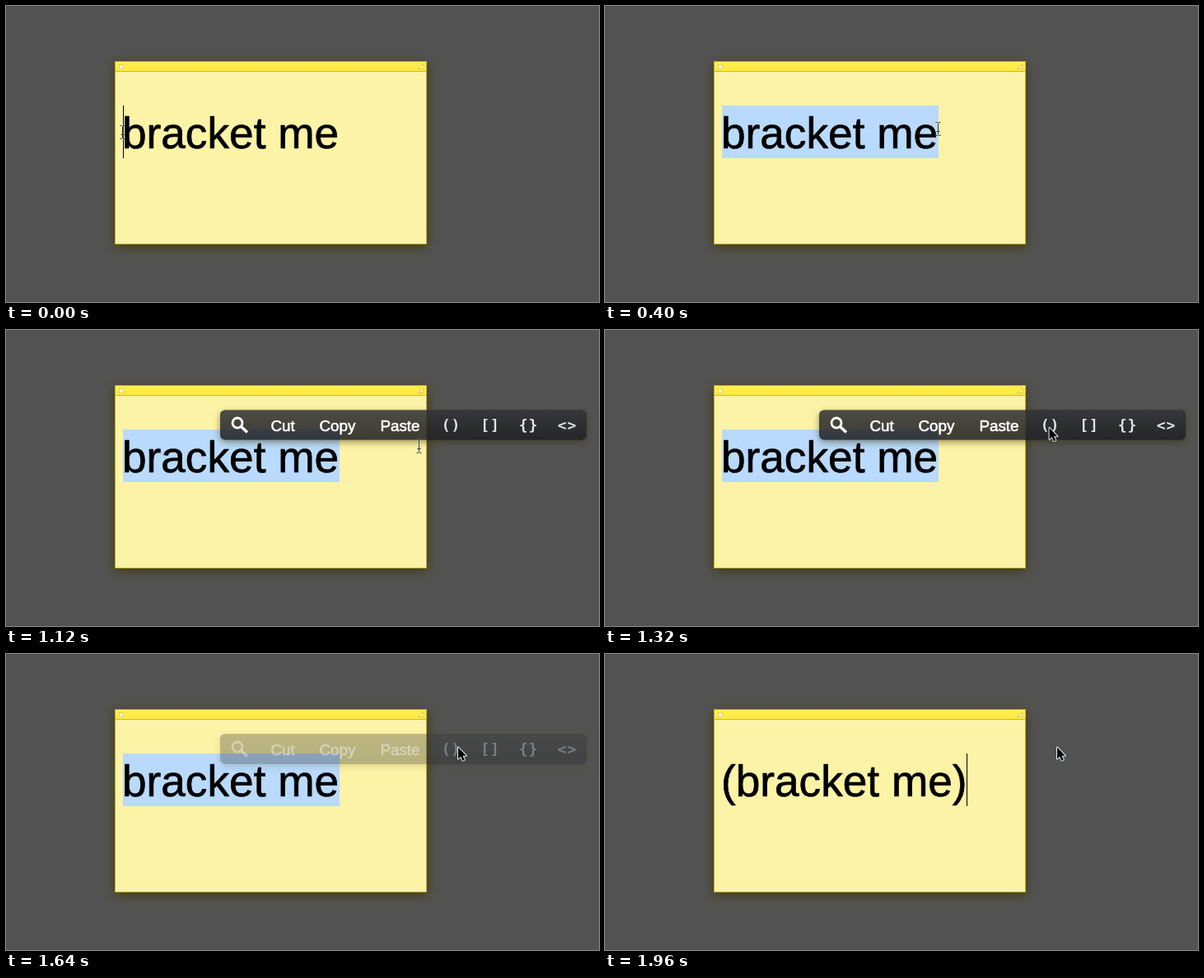
An HTML page with a canvas for the animation above (3460 ms loop, 720x360 px).

```html
<!DOCTYPE html>
<html lang="en">
<head>
<meta charset="utf-8">
<title>Bracket a selection</title>
<style>
html, body { margin: 0; width: 100%; height: 100%; overflow: hidden; background: #525252; }
canvas { display: block; }
</style>
</head>
<body>
<canvas width="720" height="360"></canvas>
<script>
const ctx = document.querySelector("canvas").getContext("2d");
const LOOP = 3460, STEP = 40, LAST_CHANGE = 1960;
const NOTE_FONT = '53.2px "Liberation Sans", Arial, sans-serif';
const MENU_FONT = '18.8px "Liberation Sans", Arial, sans-serif';
const CODE_FONT = 'bold 18px "DejaVu Sans Mono", monospace';
const TEXT = "bracket me", TEXT_X = 142, BASELINE = 173.4;

const clamp01 = v => Math.max(0, Math.min(1, v));
const progress = (t, from, to) => clamp01((t - from) / (to - from));
const smooth = p => p * p * (3 - 2 * p);
const mix = (a, b, p) => a + (b - a) * p;

function rect(x, y, w, h, color) {
  ctx.fillStyle = color;
  ctx.fillRect(x, y, w, h);
}

// a thin outline gives the text its slightly heavier strokes
function label(text, x, y, font, color, outline = 0) {
  ctx.font = font;
  ctx.fillStyle = ctx.strokeStyle = color;
  ctx.fillText(text, x, y);
  if (!outline) return;
  ctx.lineWidth = outline;
  ctx.lineJoin = "round";
  ctx.strokeText(text, x, y);
}

function shadow(color, blur, y) {
  ctx.shadowColor = color;
  ctx.shadowBlur = blur;
  ctx.shadowOffsetY = y;
}

function gradient(y1, y2, top, bottom) {
  const g = ctx.createLinearGradient(0, y1, 0, y2);
  g.addColorStop(0, top);
  g.addColorStop(1, bottom);
  return g;
}

function drawNote() {
  ctx.save();
  shadow("rgba(60,53,0,.8)", 13, 3);
  rect(132, 67, 379, 223, "#c4ab22");
  ctx.restore();
  rect(133, 68, 377, 11, gradient(68, 79, "#ffef55", "#ffea3c"));
  rect(133, 79, 377, 1, "#cdb72c");
  rect(133, 80, 377, 209, "#fdf3a7");
  rect(137, 71, 6, 6, "#e2cf55");
  rect(138, 72, 4, 4, "#fffbd8");
  ctx.beginPath();
  ctx.moveTo(500.5, 76.5);
  ctx.lineTo(507, 70.5);
  ctx.lineTo(507, 76.5);
  ctx.closePath();
  ctx.fillStyle = "#fff7b0";
  ctx.fill();
  ctx.strokeStyle = "#d9c44a";
  ctx.lineWidth = 1;
  ctx.stroke();
}

// x of the boundary between characters that lies nearest to the pointer
function selectionEnd(pointerX) {
  ctx.font = NOTE_FONT;
  let best = TEXT_X;
  for (let i = 1; i <= TEXT.length; i++) {
    const x = TEXT_X + ctx.measureText(TEXT.slice(0, i)).width;
    if (Math.abs(x - pointerX) < Math.abs(best - pointerX)) best = x;
  }
  return Math.round(best);
}

function drawText(t, pointerX) {
  const bracketed = t >= 1800;
  const end = bracketed ? 439 : selectionEnd(pointerX);
  if (bracketed || end === TEXT_X) rect(end, 121, 1, 64, "#000");
  else rect(TEXT_X, 121, end - TEXT_X, 64, "#b9dafd");
  label(bracketed ? `(${TEXT})` : TEXT, TEXT_X - 1, BASELINE, NOTE_FONT, "#000", .7);
}

function drawMenu(opacity) {
  const panel = new Path2D();
  panel.roundRect(260, 97.5, 445, 36, 6);
  const outside = new Path2D("M0 0H720V360H0Z");
  outside.addPath(panel);

  ctx.save();
  ctx.globalAlpha = opacity;
  ctx.save();
  ctx.clip(outside, "evenodd");
  shadow("rgba(50,44,0,.5)", 9, 3);
  ctx.fillStyle = "#000";
  ctx.fill(panel);
  ctx.restore();
  ctx.fillStyle = gradient(97, 133, "rgba(50,51,54,.87)", "rgba(31,32,35,.87)");
  ctx.fill(panel);

  ctx.strokeStyle = "#fff";
  ctx.lineWidth = 2.8;
  ctx.beginPath();
  ctx.arc(281, 113, 6, 0, 2 * Math.PI);
  ctx.stroke();
  ctx.lineWidth = 3.4;
  ctx.beginPath();
  ctx.moveTo(286, 118);
  ctx.lineTo(293, 124.5);
  ctx.stroke();

  for (const [text, x] of [["Cut", 321.5], ["Copy", 380.5], ["Paste", 454.5]])
    label(text, x, 123, MENU_FONT, "#fff", .6);
  ctx.textAlign = "center";
  ctx.letterSpacing = "0.8px";
  for (const [text, x] of [["()", 540.5], ["[]", 588], ["{}", 634.5], ["<>", 681.5]])
    label(text, x, 121.5, CODE_FONT, "#dce5e9");
  ctx.restore();
}

function drawBeam(x, y) {
  ctx.save();
  ctx.translate(Math.round(x) + .5, Math.round(y) + .5);
  const path = new Path2D("M-3-8h2l1 1 1-1h2M0-7V7M-3 8h2l1-1 1 1h2M-2 3h4");
  ctx.lineWidth = 2;
  ctx.strokeStyle = "rgba(255,255,255,.35)";
  ctx.stroke(path);
  ctx.lineWidth = 1;
  ctx.strokeStyle = "#333";
  ctx.stroke(path);
  ctx.restore();
}

function drawArrow(x, y) {
  ctx.save();
  ctx.translate(x, y);
  const path = new Path2D("M0 0V14L3.2 11.2 5.4 16.2 7.8 15.2 5.6 10.2H9.8Z");
  ctx.lineJoin = "round";
  ctx.lineWidth = 2;
  ctx.strokeStyle = "#e8edf2";
  ctx.stroke(path);
  ctx.fillStyle = "#050505";
  ctx.fill(path);
  ctx.restore();
}

function pointerAt(t) {
  if (t < 640) {
    const p = smooth(progress(t, 0, 390));
    return [mix(141, 404, p), mix(153, 149, p)];
  }
  if (t < 1120) {
    const p = progress(t, 640, 1120) ** 1.5;
    return [mix(404, 501, p), mix(149, 141, p)];
  }
  const p = 1 - (1 - progress(t, 1120, 1480)) ** 2;
  return [mix(501, 549, p), mix(141, 113.5, p)];
}

function draw(t) {
  const [x, y] = pointerAt(t);
  // the whole text stays selected once the drag has ended
  const dragX = Math.min(x, 405);
  rect(0, 0, 720, 360, "#525252");
  drawNote();
  drawText(t, dragX);
  if (t >= 600 && t < 1750) drawMenu(1 - smooth(progress(t, 1480, 1750)));
  if (y < 133) drawArrow(x, y);
  else drawBeam(x, y);
}

const start = performance.now();
function tick() {
  const t = (performance.now() - start) % LOOP;
  draw(Math.min(LAST_CHANGE, Math.floor(t / STEP) * STEP));
  requestAnimationFrame(tick);
}
tick();
</script>
</body>
</html>
```
